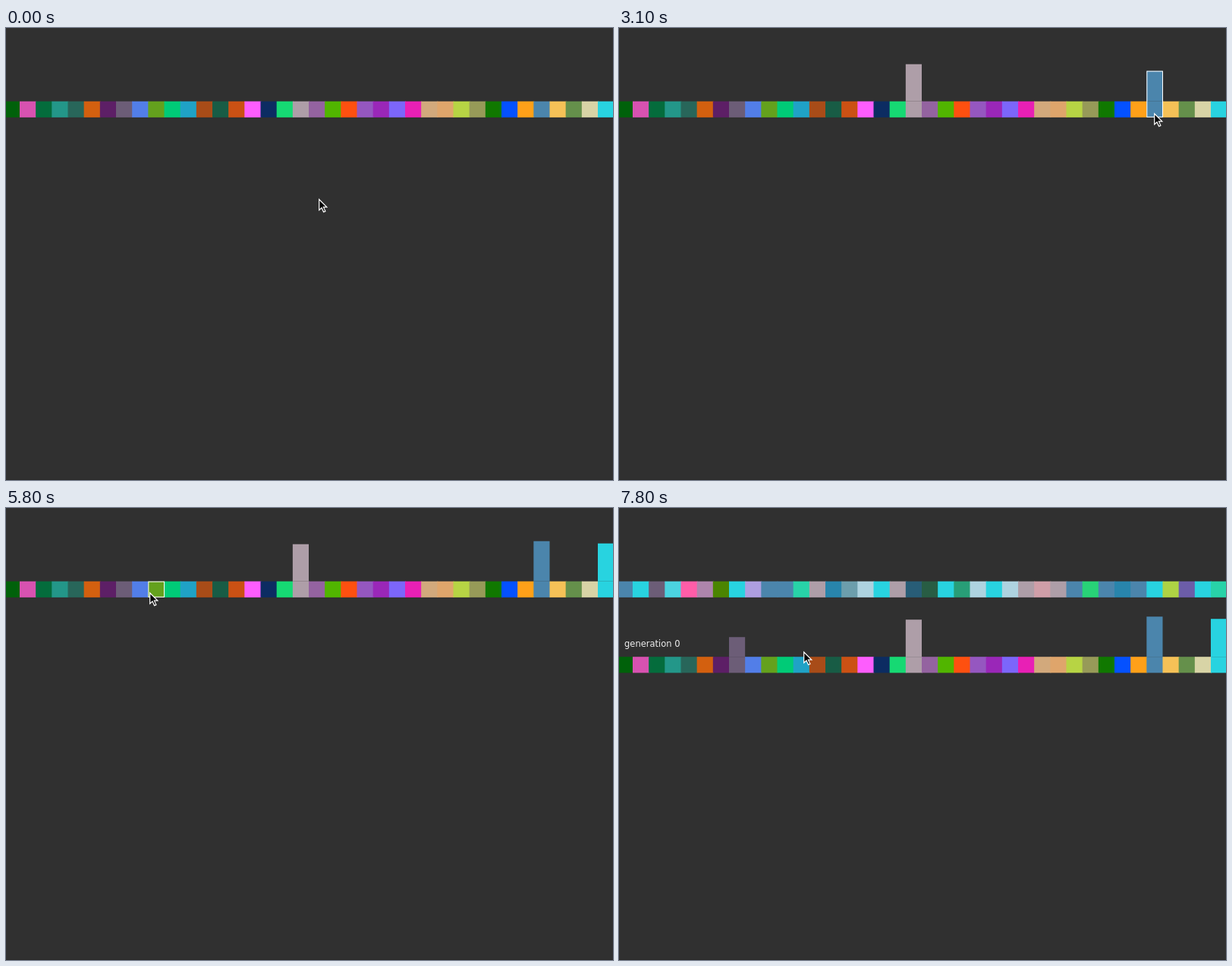
Animation, 800 px wide and 596 px high, one loop 8 s. Source, as an HTML page with a canvas:

```html
<!DOCTYPE html>
<html lang="en">
<head>
<meta charset="utf-8">
<title>Colour selection</title>
<style>
html, body { margin: 0; height: 100%; overflow: hidden; background: #303030; }
canvas { display: block; }
</style>
</head>
<body>
<canvas id="stage" width="800" height="596"></canvas>
<script>
const ctx = document.getElementById('stage').getContext('2d');
const LOOP = 8000, STEP = 100, BREED_AT = 7600;
const CELL = 762 / 36, LEFT = 18 - CELL, TOP = 96.7, BOTTOM = TOP + CELL, ROW_SHIFT = 99.5;

const parents = (
  '00610a d752b0 046c3c 239789 28665a d3600f 5d1f66 6c5d77 527ee8 64a11d ' +
  '00cb77 1fa2c6 a84c18 185c45 cb5114 fd5dfd 0c2c62 16d973 ae9ea8 9463a0 ' +
  '51b500 fe5010 9557c0 9a27b8 7c66fb e820b5 d2a97c dfa56b b7d444 979a58 ' +
  '107800 0451ff ffa019 4b85ac f5c157 65904b d8d4a6 28d3e0'
).split(' ').map(hex => '#' + hex);

// A child takes each colour channel from a chosen parent (violet, grey, blue, cyan)
// or from a mutation, given as a symbol.
const chosen = { V: 7, G: 18, B: 33, C: 37 };
const mutation = { '-': '00', '.': '44', '*': 'd0', '+': 'ff' };
const children = (
  'BBB CCC VVV BCC +VG GBB BB- CCC GGC BBB BBB CCG GGG CBB VGB GCC CCC GGG CVV ' +
  'CV. CCC CGV GCC CCC GCC GGG *GG GGG BBB CCV BBB CBB BBB CCC GC. VVG CCC CCG'
).split(' ').map(genes => '#' + [...genes].map((gene, channel) =>
  mutation[gene] || parents[chosen[gene]].substr(1 + 2 * channel, 2)).join(''));

// When each chosen cell is pressed, in ms.
const presses = { 18: [910, 1802], 33: [2440, 3457], 37: [4052, 4974], 7: [6025, 6400] };

// Turning and resting points of the pointer: time, x, y.
const path = [
  [0, 412, 225], [300, 48, 108], [700, 748, 108], [950, 389, 109], [1800, 389, 109],
  [2000, 520, 161], [2100, 617, 133], [2400, 705, 112], [3700, 705, 112],
  [4000, 793, 104], [5100, 793, 104], [5800, 189, 111], [6100, 156, 109],
  [6500, 156, 109], [6700, 243, 189], [LOOP, 243, 189]
];

function pointerAt(time) {
  const next = path.findIndex(point => point[0] > time);
  const [t0, x0, y0] = path[next - 1], [t1, x1, y1] = path[next];
  const k = (time - t0) / (t1 - t0);
  return { x: x0 + (x1 - x0) * k, y: y0 + (y1 - y0) * k };
}

// A pressed cell rises ever more slowly and keeps its height when released.
function extraHeight(index, time) {
  if (!presses[index]) return 0;
  const [start, end] = presses[index];
  const held = Math.max(0, Math.min(time, end) - start);
  return 83 * (1 - Math.exp(-held / 1000));
}

const cellX = index => LEFT + index * CELL;

function drawRow(colors, shift) {
  colors.forEach((color, i) => {
    ctx.fillStyle = color;
    ctx.fillRect(cellX(i), TOP + shift, CELL + 1, CELL); // overlap hides the seams
  });
}

function drawBars(shift, time) {
  for (const index in presses) {
    const height = extraHeight(index, time);
    ctx.fillStyle = parents[index];
    ctx.fillRect(cellX(index), TOP + shift - height, CELL, height);
  }
}

function drawOutline(pointer, time) {
  if (pointer.y < TOP || pointer.y >= BOTTOM) return;
  const index = Math.floor((pointer.x - LEFT) / CELL);
  const top = TOP - extraHeight(index, time) + 0.5;
  ctx.strokeStyle = '#fff';
  ctx.lineWidth = 1;
  ctx.strokeRect(cellX(index) + 0.5, top, CELL - 0.5, BOTTOM - 0.5 - top);
}

const arrow = new Path2D('M.7 1V15.2L4 12.1L6.6 17.6L8.9 16.6L6.4 11.2H10.8Z');
function drawPointer({ x, y }) {
  ctx.save();
  ctx.translate(x, y);
  ctx.fillStyle = '#000';
  ctx.strokeStyle = '#fff';
  ctx.lineWidth = 1.2;
  ctx.fill(arrow);
  ctx.stroke(arrow);
  ctx.restore();
}

function draw(now) {
  const time = Math.floor((now % LOOP) / STEP) * STEP;
  const pointer = pointerAt(time);
  const bred = time >= BREED_AT;
  const shift = bred ? ROW_SHIFT : 0;
  ctx.fillStyle = '#303030';
  ctx.fillRect(0, 0, 800, 596);
  ctx.fillStyle = '#292929';
  ctx.fillRect(0, 595, 800, 1);
  drawRow(parents, shift);
  drawBars(shift, time);
  if (bred) {
    drawRow(children, 0);
    ctx.fillStyle = '#eee';
    ctx.font = '11.5px "DejaVu Sans", sans-serif';
    ctx.fillText('generation 0', 7, 183);
  }
  drawOutline(pointer, time);
  drawPointer(pointer);
}

const begin = performance.now();
function tick() {
  draw(performance.now() - begin);
  requestAnimationFrame(tick);
}
tick();
</script>
</body>
</html>
```
